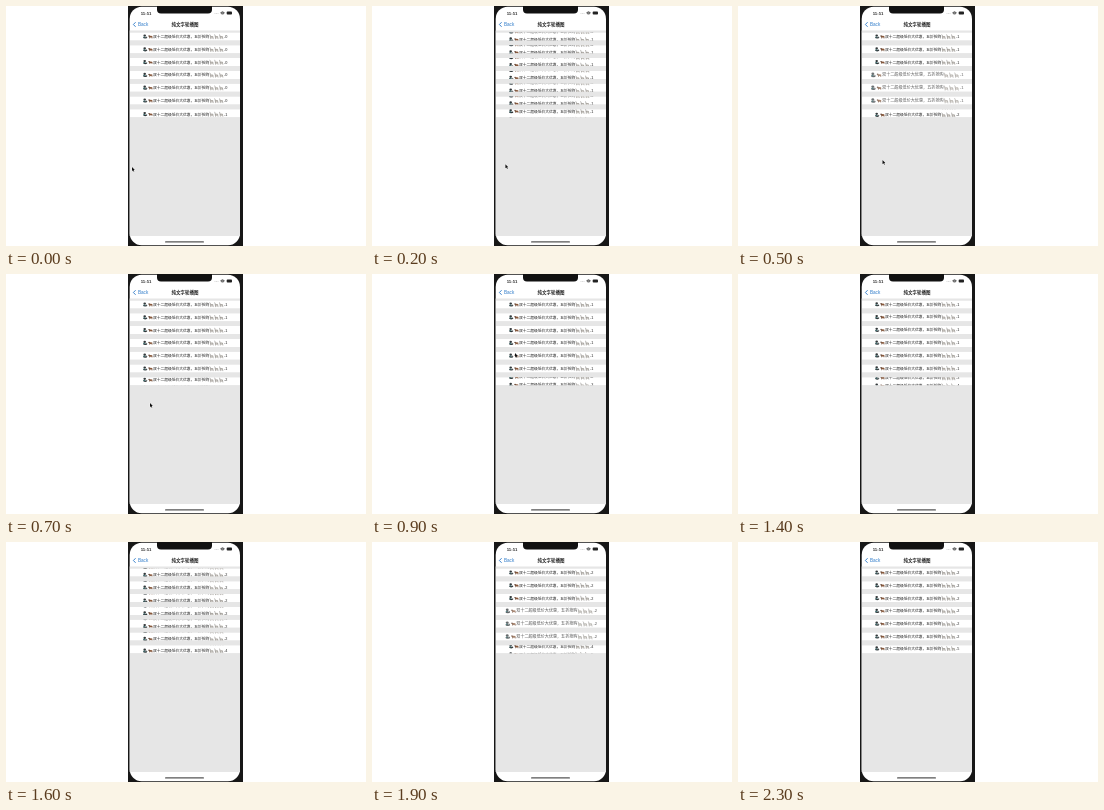
An HTML page with a canvas that plays this animation: 360x240 px, repeating every 2400 ms.

```html
<!DOCTYPE html>
<html lang="zh">
<head>
<meta charset="utf-8">
<style>
html, body { margin: 0; width: 100%; height: 100%; overflow: hidden; background: #fff; }
canvas { display: block; }
</style>
</head>
<body>
<canvas id="stage" width="360" height="240"></canvas>
<script>
const ctx = document.getElementById('stage').getContext('2d');
const LOOP = 2400, STEP = 100, ROW_H = 8;
const SCROLL_ENDS = [310, 1690], SCROLL_TIME = 300;
const SANS = '"Liberation Sans", Arial, sans-serif';
const CJK = '"Noto Sans CJK SC", "Noto Sans CJK", sans-serif';
// time, x, y of the pointer tip
const POINTER = [[0, 126, 161], [500, 144.5, 154], [600, 144.5, 154], [900, 143, 79], [1200, 142, 48.5]];

const clamp = v => Math.max(0, Math.min(1, v));

function rect(x, y, w, h, color, r = 0) {
  ctx.fillStyle = color;
  ctx.beginPath();
  ctx.roundRect(x, y, w, h, r);
  ctx.fill();
}

function oval(x, y, rx, ry, color) {
  ctx.fillStyle = color;
  ctx.beginPath();
  ctx.ellipse(x, y, rx, ry, 0, 0, 7);
  ctx.fill();
}

function line(points, color, width) {
  ctx.strokeStyle = color;
  ctx.lineWidth = width;
  ctx.beginPath();
  points.forEach(([x, y]) => ctx.lineTo(x, y));
  ctx.stroke();
}

function text(str, x, y, font, color, align = 'left') {
  ctx.font = font;
  ctx.fillStyle = color;
  ctx.textAlign = align;
  ctx.textBaseline = 'alphabetic';
  ctx.fillText(str, x, y);
}

function panda(x) {
  oval(x + 1.7, -1, 1.3, 1.1, '#34393b');
  oval(x + 2.2, 1, 2.1, 1.1, '#2d3538');
  oval(x + 1.2, .5, .6, .6, '#4b9a9b');
  oval(x + 2.9, .3, .7, .6, '#d5dcdc');
}

function ox(x) {
  oval(x + 2.7, .2, 1.8, .9, '#8a5a3c');
  oval(x + 1.1, -.5, .8, .7, '#5a3826');
  rect(x + 1.5, .5, .6, 1.4, '#64402c');
  rect(x + 3.7, .5, .6, 1.4, '#64402c');
}

function goat(x) {
  oval(x + 2.6, .6, 1.7, 1.1, '#e2dfda');
  line([[x + .4, -1.9], [x + 1.2, -1.5], [x + 1.2, .2], [x + 3.7, .1], [x + 4.2, 2.6]], '#77736e', .5);
  line([[x + 1.5, .4], [x + 1.6, 2.6]], '#77736e', .5);
  line([[x + 1.7, 1.5], [x + 3.8, 1.5]], '#a5a19b', .5);
}

// One banner line, centred on (179.5, y)
function banner(n, y, zoom) {
  ctx.save();
  ctx.translate(179.5, y);
  ctx.scale(zoom, zoom);
  ctx.globalAlpha = 1 - (zoom - 1) * 3;
  panda(-42.5);
  ox(-37.5);
  text('双十二超级低价大优惠，五折抢购', -32.4, 1.4, '500 3.75px ' + CJK, '#1c1c1c');
  [23.6, 28.4, 33.2].forEach(goat);
  text('-' + n, 38.6, 1.4, '3.8px ' + SANS, '#222');
  ctx.restore();
}

function row(i, pos, zoom) {
  const y = 30.5 + 12.8 * i, n = Math.floor(pos);
  ctx.save();
  ctx.beginPath();
  ctx.rect(124, y - ROW_H / 2, 110, ROW_H);
  ctx.clip();
  rect(124, y - ROW_H / 2, 110, ROW_H, '#fff');
  for (const k of [n, n + 1]) banner(k, y + (k - pos) * ROW_H, zoom);
  ctx.restore();
}

function phone() {
  rect(122, 0, 115, 240, '#171717');
  rect(123.7, .7, 110.3, 238.6, '#fff', 12);
  rect(123.7, 24.5, 110.3, 205.5, '#e6e6e6');
  rect(151, 0, 55, 7.6, '#111', [0, 0, 4, 4]);
  text('11:51', 134.7, 8.7, 'bold 4.3px ' + SANS, '#333');
  for (let i = 0; i < 3; i++) oval(209 + i * 1.5, 7.5, .4, .4, '#aaa');
  for (const r of [1, 2, 3]) {
    ctx.strokeStyle = '#222';
    ctx.lineWidth = .8;
    ctx.beginPath();
    ctx.arc(216.5, 9, r, -2.35, -.79);
    ctx.stroke();
  }
  rect(220.7, 5.6, 5.3, 2.9, '#222', .8);
  line([[129.6, 16.2], [127.4, 18.5], [129.6, 20.8]], '#2a78c8', .9);
  text('Back', 132, 20.2, '4.6px ' + SANS, '#2a78c8');
  text('纯文字轮播图', 179, 20.3, 'bold 4.5px ' + CJK, '#222', 'center');
  rect(159, 235.2, 39, 1.4, '#555', .7);
}

function pointer(t) {
  const k = POINTER.findIndex(p => p[0] >= t);
  if (k < 0) return;
  const b = POINTER[k], a = POINTER[Math.max(0, k - 1)];
  const f = b === a ? 0 : (t - a[0]) / (b[0] - a[0]);
  ctx.save();
  ctx.translate(a[1] + (b[1] - a[1]) * f, a[2] + (b[2] - a[2]) * f);
  ctx.scale(.9, .9);
  ctx.beginPath();
  [[0, 0], [0, 4.6], [1.1, 3.7], [1.9, 5.4], [2.6, 5], [1.9, 3.4], [3.2, 3.3]]
    .forEach(([x, y]) => ctx.lineTo(x, y));
  ctx.closePath();
  ctx.strokeStyle = '#fff';
  ctx.lineWidth = .6;
  ctx.stroke();
  ctx.fillStyle = '#111';
  ctx.fill();
  ctx.restore();
}

function draw(t) {
  ctx.clearRect(0, 0, 360, 240);
  phone();
  let pos = 0, zoom = 1;
  for (const end of SCROLL_ENDS) {
    pos += clamp((t - end + SCROLL_TIME) / SCROLL_TIME);
    if (t >= end) zoom = Math.max(1, 1.19 - (t - end) * .0005);
  }
  for (let i = 0; i < 6; i++) row(i, pos, i < 3 ? 1 : zoom);
  row(6, .9 + t * .00183, 1);
  pointer(t);
}

const start = performance.now();
function tick() {
  const t = (performance.now() - start) % LOOP;
  draw(Math.floor(t / STEP) * STEP);
  requestAnimationFrame(tick);
}
tick();
</script>
</body>
</html>
```
